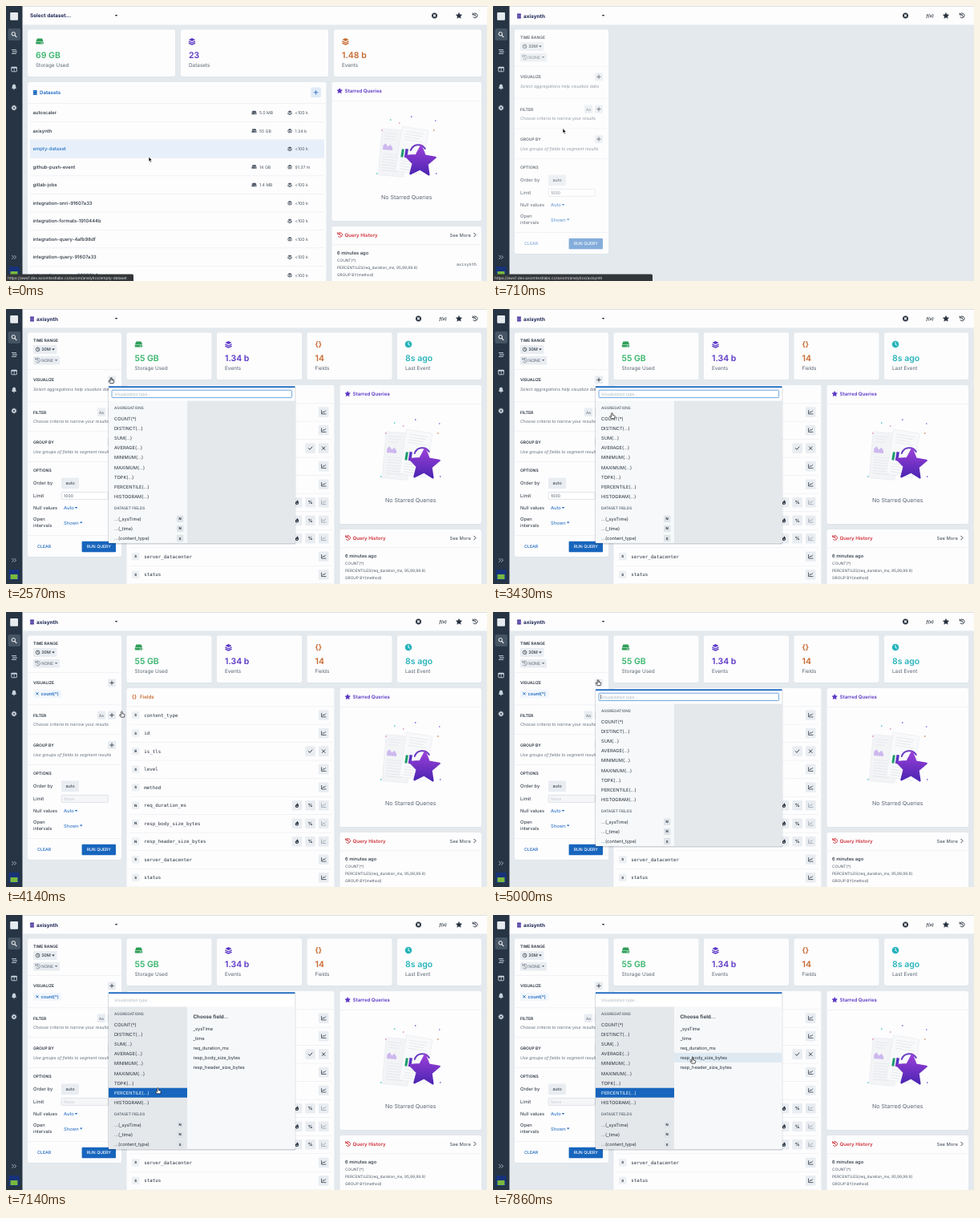
These frames come from a looping animation (600 px wide and 343 px high, 8000 ms). An HTML page:

```html
<!DOCTYPE html>
<html lang="en">
<head>
<meta charset="utf-8">
<title>Dataset query builder</title>
<style>
html, body { margin: 0; width: 100%; height: 100%; overflow: hidden; background: #e4e9ee; }
svg { display: block; width: 100vw; height: 100vh; }
text { font-family: Inter, Roboto, sans-serif; font-feature-settings: "calt" 0; text-rendering: geometricPrecision; white-space: pre; }
.mono { font-family: "DejaVu Sans Mono", monospace; }
</style>
</head>
<body>
<svg id="stage" viewBox="0 0 600 343"></svg>
<script>
const LOOP = 8000, STEPS = 56;
const INK = '#26303c', GREY = '#586370', FAINT = '#8a949f', LINE = '#e8ecf0', BUTTON = '#e9edf1',
  BLUE = '#1765bd', GREEN = '#38b56c', PURPLE = '#5a35c4', ORANGE = '#c8692f', TEAL = '#27b4bb', RED = '#d0323a';

// Steps at which the interface changes state
const AT = { hoverRow: 2, page: 4, loaded: 9, statusGone: 10, open: 16, added: 27, close: 28, reopen: 35, picked: 46 };

// Pointer path: step, x, y of the hot spot
const PATH = [[0, 178, 188], [1, 168, 176], [2, 140, 160], [3, 103, 154], [4, 87, 152.5], [5, 87, 152.5], [8, 91, 147],
  [12, 126.5, 93], [14, 131, 86], [19, 131, 86], [24, 148.5, 130], [25, 148, 135], [28, 148, 135], [32, 134, 93],
  [33, 131, 85], [35, 131, 85], [37, 133, 90], [38, 133, 90], [39, 138, 112], [42, 166, 218.5], [48, 167, 219.5],
  [49, 167, 219.5], [51, 212, 213], [52, 212, 213], [55, 249, 178.5]];

const MENU = ['COUNT(*)', 'DISTINCT(...)', 'SUM(...)', 'AVERAGE(...)', 'MINIMUM(...)', 'MAXIMUM(...)', 'TOPK(...)',
  'PERCENTILE(...)', 'HISTOGRAM(...)'];
const NUMERIC = ['_sysTime', '_time', 'req_duration_ms', 'resp_body_size_bytes', 'resp_header_size_bytes'];
const FIELDS = [['content_type', 'S'], ['id', 'S'], ['is_tls', 'B'], ['level', 'S'], ['method', 'S'], ['req_duration_ms', 'N'],
  ['resp_body_size_bytes', 'N'], ['resp_header_size_bytes', 'N'], ['server_datacenter', 'S'], ['status', 'S']];
const DATASETS = [['autoscaler', '<100 k', '5.0 MB'], ['axisynth', '1.34 b', '55 GB'], ['empty-dataset', '<100 k'],
  ['github-push-event', '91.37 m', '14 GB'], ['gitlab-jobs', '<100 k', '1.4 MB'], ['integration-onri-91607a33', '<100 k'],
  ['integration-formats-1910444b', '<100 k'], ['integration-query-4afb98df', '<100 k'],
  ['integration-query-91607a33', '<100 k'], ['integration-query-c30290b4', '<100 k']];

const text = (x, y, s, size, fill = INK, weight = 400, attrs = '') =>
  `<text x="${x}" y="${y}" font-size="${size}" fill="${fill}" font-weight="${weight}" ${attrs}>${s.replace(/</g, '&lt;')}</text>`;
const mono = (x, y, s, size, fill = INK, weight = 400) => text(x, y, s, size, fill, weight, 'class="mono"');
const rect = (x, y, w, h, fill, r = 0, attrs = '') =>
  `<rect x="${x}" y="${y}" width="${w}" height="${h}" rx="${r}" fill="${fill}" ${attrs}/>`;
const circle = (x, y, r, fill, attrs = '') => `<circle cx="${x}" cy="${y}" r="${r}" fill="${fill}" ${attrs}/>`;
const stroke = (d, color = INK, w = 1) =>
  `<path d="${d}" fill="none" stroke="${color}" stroke-width="${w}" stroke-linecap="round" stroke-linejoin="round"/>`;
const shape = (d, fill, attrs = '') => `<path d="${d}" fill="${fill}" ${attrs}/>`;
const group = (x, y, body, more = '') => `<g transform="translate(${x} ${y}) ${more}">${body}</g>`;
const range = (n, f) => Array.from({ length: n }, (_, i) => f(i)).join('');
const card = (x, y, w, h) => rect(x, y + .6, w, h, '#d8dfe5', 2.5) + rect(x, y, w, h, '#fdfdfe', 2.5);
const rule = (x1, x2, y) => rect(x1, y, x2 - x1, .6, LINE);

// Icons, centred on x, y
const caret = (x, y, c = INK) => shape(`M${x - 1.8} ${y - .9}h3.6l-1.8 2z`, c);
const plus = (x, y, c = INK) => stroke(`M${x - 2.3} ${y}h4.6M${x} ${y - 2.3}v4.6`, c, .8);
const cross = (x, y, r, c, w) => stroke(`M${x - r} ${y - r}l${2 * r} ${2 * r}m0 ${-2 * r}l${-2 * r} ${2 * r}`, c, w);
const layers = (x, y, s, c) => group(x, y, shape('M-4-2L0-4L4-2L0 0Z', c) +
  stroke('M-3.7.2L0 2L3.7.2M-3.7 2.4L0 4.2L3.7 2.4', c, 1.3), `scale(${s})`);
const database = (x, y, c) => range(3, i => rect(x - 2.6, y - 3 + i * 2.1, 5.2, 1.8, c, .8));
const disk = (x, y, s, c) => group(x, y, shape('M-3-3.4H3L4.6 0H-4.6Z', c) + rect(-4.8, .4, 9.6, 3.2, c, 1) +
  circle(2, 2, .6, '#fff') + circle(3.6, 2, .6, '#fff'), `scale(${s})`);
const clock = (x, y, r, c) => circle(x, y, r, 'none', `stroke="${c}" stroke-width=".7"`) + stroke(`M${x} ${y - r * .55}v${r * .55}l${r * .45} ${r * .3}`, c, .6);
const history = (x, y, c) => stroke(`M${x - 2.4} ${y - 1.6}A2.9 2.9 0 1 1 ${x - 2} ${y + 2}M${x - 2.8} ${y - 3}v2h2M${x} ${y - 1.5}v1.6l1.2.8`, c, .9);
const starPath = (r, inner) => 'M' + Array.from({ length: 10 }, (_, i) => {
  const a = i * Math.PI / 5 - Math.PI / 2, d = i % 2 ? r * inner : r;
  return `${(d * Math.cos(a)).toFixed(2)} ${(d * Math.sin(a)).toFixed(2)}`;
}).join('L') + 'Z';
const star = (x, y, r, c) => group(x, y, shape(starPath(r, .5), c, `stroke="${c}" stroke-width=".5" stroke-linejoin="round"`));
const chart = (x, y, c) => stroke(`M${x - 2.6} ${y - 2.3}v4.6h5.4M${x - 1.4} ${y + .7}l1.2-1.4l1 .9l1.6-1.9`, c, .75);
const flame = (x, y) => shape(`M${x} ${y - 3}C${x + 3} ${y - 1} ${x + 2.6} ${y + 2.7} ${x} ${y + 2.7}C${x - 3} ${y + 2.7} ${x - 2.4} ${y - .4} ${x - 1} ${y - 1}Q${x + .2} ${y - 1.4} ${x} ${y - 3}`, INK) + circle(x, y + 1, .7, '#fff');
const button = (x, y, w = 12.6) => rect(x - w / 2, y - w / 2, w, w, BUTTON, 1.3);

function sidebar() {
  const c = '#c9d2dc', base = '#263443';
  return rect(0, 0, 20.5, 343, base) + rect(5.2, 8, 9.8, 9.8, '#e6ebf0', 1) +
    rect(2.5, 28, 15.5, 15, '#465564', 2) + circle(9.3, 34.8, 2.2, 'none', `stroke="#fff" stroke-width="1"`) + stroke('M11 36.6l2 2', '#fff', 1.1) +
    range(3, i => rect(i % 2 ? 8 : 7, 54.2 + i * 2.3, 6, 1, c)) +
    rect(6.8, 76.2, 6.6, 5.6, 'none', .6, `stroke="${c}" stroke-width=".9"`) + rect(6.6, 76, 7, 1.7, c) + rect(9.8, 77, .7, 5, c) +
    shape('M7 103C8 102 7.6 100 8 99Q8.6 97.6 10 97.4Q11.6 97.6 12 99C12.4 100 12 102 13 103Z', c) + circle(10, 103.8, .8, c) +
    range(4, i => group(10, 127, rect(-.7, -3.3, 1.4, 6.6, c), `rotate(${i * 45})`)) + circle(10, 127, 2.4, c) + circle(10, 127, 1, base) +
    stroke('M7.5 311.2l2.1 2.1l-2.1 2.1M10.5 311.2l2.1 2.1l-2.1 2.1', c, .8) +
    rect(3.5, 325, 13, 13, '#17327a') + rect(5.5, 331, 9, 6, '#79b83e');
}

function topbar(home) {
  const x = home ? 534.5 : 514.5;
  return rect(20.5, 0, 579.5, 23.4, '#fdfdfe') + rect(20.5, 0, 579.5, .7, '#cfd5db') +
    (home ? text(30, 14.4, 'Select dataset...', 6.4, '#1c2553', 700)
      : database(32.5, 12.5, '#46309c') + text(38, 14.6, 'axisynth', 6.4, '#1c2553', 700) + text(540.5, 14.2, 'f(x)', 5.4, INK, 600, 'font-style="italic"')) +
    caret(137.5, 12) + circle(x, 12, 3.5, INK) + circle(x, 12, 1.4, '#fff') + cross(x, 12, 2.2, '#fff', .5) +
    star(565, 12.2, 3.8, INK) + history(585, 12, INK);
}

const stat = (x, w, color, icon, value, label) => card(x, 29.5, w, 58.5) + icon +
  text(x + 10, 64.6, value, 10.5, color, 600) + text(x + 10, 75.5, label, 6.4, GREY);

function illustration() {
  const dots = [[-20, -36, TEAL], [-9, -32, '#e06bb0'], [6, -40, PURPLE], [36, -35, '#8b4be0'], [34, -23, ORANGE], [-31, -23, '#e06bb0'], [-37, 31, TEAL], [37, 31, PURPLE]];
  const ruled = (x, y, n, w) => range(n, i => rect(x, y + i * 3.4, w - (i % 3) * 2, .8, '#e3e6eb'));
  return group(-18, 4, rect(-15, -28, 32, 58, '#f3f4f6', 1, 'stroke="#e6e9ed" stroke-width=".6"') + ruled(-11, -23, 3, 16) +
      shape('M-12 -2V-7L-9 -10L-6 -6L-3 -9L0 -5V-2Z', '#cdb8ee') + ruled(-11, 3, 7, 20), 'rotate(5)') +
    group(5, 2, rect(-15, -28, 33, 56, '#f8f9fa', 1, 'stroke="#e8eaee" stroke-width=".6"') + ruled(-10, -23, 4, 23) +
      rect(-11, 0, 3, 10, '#1d9c6c') + rect(-6.5, -1, 3.5, 11, PURPLE) + ruled(-10, 14, 4, 16), 'rotate(9)') +
    stroke('M5 2A10 10 0 0 1 23 0', '#6b3cc4', 2) +
    group(17, 16, shape(starPath(19.5, .48), 'url(#violet)', 'stroke="url(#violet)" stroke-width="2.4" stroke-linejoin="round"'), 'rotate(3)') +
    dots.map(([x, y, c]) => circle(x, y, .8, c)).join('');
}

function rightColumn(home) {
  const x = home ? 406.5 : 416.5, w = 593 - x, mid = x + w / 2;
  return card(x, 95, w, 173) + star(x + 9.7, 106, 3.4, PURPLE) + text(x + 16, 108.3, 'Starred Queries', 6.1, PURPLE, 600) + rule(x, 593, 118) +
    group(mid, 178, illustration()) + text(mid, 241, 'No Starred Queries', 7, GREY, 400, 'text-anchor="middle"') +
    card(x, 275, w, 80) + history(x + 10, 285.5, RED) + text(x + 16, 288, 'Query History', 6.1, RED, 600) +
    text(553.5, 287.6, 'See More', 5.8, '#3c4754') + stroke('M583.8 283.2l2.2 2.3l-2.2 2.3', INK, .9) + rule(x, 593, 297.5) +
    text(x + 6.5, 310.4, '6 minutes ago', 5.8, INK, 500) +
    ['COUNT(*)', 'PERCENTILES(req_duration_ms, 95,99,99.9)', 'GROUP BY(method)'].map((s, i) => text(x + 6.5, 319.2 + i * 8.9, s, 4.8, '#4a5562')).join('') +
    (home ? mono(562, 323.6, 'axisynth', 5.2, GREY) : '');
}

function homePage(n) {
  const hovered = n < AT.hoverRow ? 2 : 1;
  return stat(27, 184, GREEN, disk(42, 44, 1, '#2f9e58'), '69 GB', 'Storage Used') +
    stat(218, 184, PURPLE, layers(232, 44, 1, PURPLE), '23', 'Datasets') +
    stat(409, 184, ORANGE, layers(423.5, 44, 1, ORANGE), '1.48 b', 'Events') +
    card(27, 95, 372.5, 260) + database(36.3, 108, BLUE) + text(42, 110.2, 'Datasets', 6.1, BLUE, 600) +
    rect(380.3, 101.5, 12.6, 12.6, '#dfebf7', 1.3) + plus(386.6, 107.8, BLUE) + rule(27, 399.5, 121) +
    DATASETS.map(([name, events, size], i) => {
      const y = 133 + i * 22.5, on = i === hovered;
      return (on ? rect(30, y - 11.2, 367, 22.5, '#e7f0fa') : '') + rule(30, 397, y + 11) +
        text(33.5, y + 2.1, name, 5.9, on ? '#2672c4' : INK, 500) + layers(354, y, .65, '#4a5562') + text(360.5, y + 2, events, 5.2, '#4a5562') +
        (size ? disk(309.5, y, .65, '#4a5562') + text(316, y + 2, size, 5.2, '#4a5562') : '');
    }).join('') + rightColumn(true);
}

function queryPanel(n) {
  const ready = n >= AT.loaded, counted = n >= AT.added;
  const title = (y, s) => text(34, y, s, 5, INK, 600), hint = (y, s) => text(34, y, s, 5.25, '#65707d', 400, 'font-style="italic"');
  const add = y => button(132, y, 10.2) + plus(132, y);
  const body = title(40.6, 'TIME RANGE') +
    rect(34, 45.1, 29.5, 10.8, BUTTON, 1.3) + clock(39.6, 50.4, 2.3, INK) + text(44.3, 52.3, '30M', 5.2, INK, 500) + caret(59, 50.3) +
    rect(34, 58.8, 33, 10.8, BUTTON, 1.3) + history(39.6, 64.1, FAINT) + text(44.3, 66, 'NONE', 5.1, '#6d7885', 500) + caret(62.6, 64, '#6d7885') +
    rule(27, 144, 75) + title(90.3, 'VISUALIZE') + add(88.3) +
    (counted ? rect(34, 96.8, 35.5, 10, '#f1f6fc', 1.3) + cross(39, 101.8, 1.3, BLUE, .9) + text(43.6, 103.7, 'count(*)', 5.5, BLUE, 600)
      : hint(102, 'Select aggregations help visualize data')) +
    rule(27, 144, 115.5) + title(130.8, 'FILTER') + button(119, 128.7, 10.4) + text(116, 130.5, 'Aa', 4.7, GREY) + add(128.7) +
    hint(142.3, 'Choose criteria to narrow your results') +
    rule(27, 144, 152.5) + title(168, 'GROUP BY') + add(166) + hint(179.5, 'Use groups of fields to segment results') +
    rule(27, 144, 190) + title(202.8, 'OPTIONS') + text(34, 219.4, 'Order by', 5.9) + rect(69, 210.6, 22, 13.6, BUTTON, 1.3) + text(74.5, 219.3, 'auto', 5.4) +
    text(34, 234.8, 'Limit', 5.9) + rect(69.2, 228.4, 58.2, 9, counted ? '#f5f6f8' : '#fff', 1, 'stroke="#ccd3da" stroke-width=".6"') +
    text(72.3, 234.8, counted ? 'None' : '1000', 5.1, counted ? '#c0c8d0' : '#4a5562') +
    text(34, 249.8, 'Null values', 5.8) + text(72, 249.8, 'Auto', 5.8, BLUE) + caret(87.5, 247.8, BLUE) +
    text(34, 264, 'Open', 5.8) + text(34, 272.4, 'intervals', 5.8) + text(72, 268.5, 'Shown', 5.8, BLUE) + caret(93.7, 266.5, BLUE);
  const actions = text(39, 298.3, 'CLEAR', 5.3, BLUE, 500) + rect(94.6, 289.8, 42.4, 13.4, BLUE, 1) +
    text(115.8, 298.4, 'RUN QUERY', 5.2, '#fff', 500, 'text-anchor="middle"');
  return card(27, 29.5, 117, 279.5) + `<g opacity="${ready ? 1 : .7}">${body}</g>` +
    rule(27, 144, 282) + `<g opacity="${ready ? 1 : .52}">${actions}</g>`;
}

function datasetContent() {
  const badge = (y, s) => rect(157, y - 4.7, 9.4, 9.4, '#edf0f3', 1) + text(161.7, y + 1.6, s, 4.4, INK, 700, 'text-anchor="middle"');
  return stat(150.5, 106, GREEN, disk(165.5, 44, 1, '#2f9e58'), '55 GB', 'Storage Used') +
    stat(263, 106, PURPLE, layers(277.5, 44, 1, PURPLE), '1.34 b', 'Events') +
    stat(375.5, 106, ORANGE, text(385.5, 47, '{}', 9, ORANGE, 700), '14', 'Fields') +
    stat(488, 105, TEAL, circle(502, 44, 4.3, TEAL) + stroke('M502 41.5v2.7l1.6 1', '#fff', .9), '8s ago', 'Last Event') +
    card(150.5, 95, 259, 260) + text(157, 108.4, '{}', 6.5, ORANGE, 700) + text(167, 108.3, 'Fields', 6.1, ORANGE, 600) + rule(150.5, 409.5, 117.5) +
    FIELDS.map(([name, type], i) => {
      const y = 128.6 + i * 22.52;
      const tools = type === 'B' ? button(379.6, y) + stroke(`M377.3 ${y}l1.6 1.7l3-3.4`, INK, .9) + button(396.2, y) + cross(396.2, y, 1.8, INK, .9)
        : type === 'N' ? button(363, y) + flame(363, y) + button(379.6, y) + text(379.6, y + 2.1, '%', 5.8, INK, 600, 'text-anchor="middle"') + button(396.2, y) + chart(396.2, y, '#929ca7')
        : button(396.2, y) + chart(396.2, y, INK);
      return badge(y, type) + mono(172.3, y + 2, name, 5.83) + tools + rule(154, 406, y + 11.2);
    }).join('') + rightColumn(false);
}

function popup(n, tip) {
  const picked = n >= AT.picked, overList = tip.x > 128 && tip.x < 226;
  const hit = (top, count) => { const i = Math.floor((tip.y - top + 6.05) / 12.1); return i >= 0 && i < count ? i : -1; };
  const hover = overList ? hit(137, MENU.length) : -1;
  const fieldHover = picked && tip.x > 226 ? hit(141.5, NUMERIC.length) : -1;
  const focused = hover < 0 && !picked, light = '#f6f8f9', dim = '#e5e8eb';
  let out = rect(127.2, 97, 234.1, 196.5, '#17263a', 1.5, 'opacity=".2"') + rect(128, 96.3, 232.5, 195.5, '#fff', 1) + rect(128, 96.3, 232.5, 1.8, BLUE) +
    rect(128, 114.5, 98, 177.3, picked ? dim : light) + rect(226, 114.5, 134.5, 177.3, picked ? light : dim) +
    (focused ? rect(132, 101.2, 224.6, 9.4, '#fff', 1, 'stroke="#4a8fd4" stroke-width=".8"') : '') +
    text(135, 107.7, 'Visualization type...', 4.9, '#aab3bd', 400, 'font-style="italic"') +
    (n >= AT.reopen && focused ? rect(134.3, 103, .6, 5.8, INK) : '') + text(135, 125.3, 'AGGREGATIONS', 4.7, '#4d5967', 500);
  MENU.forEach((s, i) => {
    const y = 137 + i * 12.1, active = picked && i === 7;
    if (active || i === hover) out += rect(128, y - 6, 98, 12, active ? BLUE : '#dfe9f1');
    out += text(135, y + 2, s, 5.7, active ? '#fff' : INK);
  });
  out += text(135, 249.6, 'DATASET FIELDS', 4.7, '#4d5967', 500);
  [['_sysTime', 'N'], ['_time', 'N'], ['content_type', 'S']].forEach(([s, type], i) => {
    const y = 261.6 + i * 12.1;
    out += text(135, y + 2, `...(${s})`, 5.7) + rect(213, y - 4, 8.4, 8.4, '#dfe4e9', 1) + text(217.2, y + 1.7, type, 4.2, INK, 700, 'text-anchor="middle"');
  });
  if (picked) {
    out += text(233.4, 128.9, 'Choose field...', 6.3, INK, 600);
    NUMERIC.forEach((s, i) => {
      const y = 141.5 + i * 12.1;
      if (i === fieldHover) out += rect(226, y - 6, 134.5, 12, '#dfe9f1');
      out += text(233.4, y + 2, s, 5.7);
    });
  } else if (hover >= 0) {
    const word = MENU[hover].split('(')[0].toLowerCase();
    out += text(233.4, 130.9, MENU[hover], 6.4, INK, 600) +
      text(233.4, 143, `Visualize the ${word} value for a field in`, 5.35) + text(233.4, 151.4, 'each time duration.', 5.35);
  }
  return out;
}

function pointerAt(n) {
  const k = Math.max(1, PATH.findIndex(p => p[0] >= n)), [a, x0, y0] = PATH[k - 1], [b, x1, y1] = PATH[k];
  const u = (n - a) / (b - a);
  return { x: x0 + (x1 - x0) * u, y: y0 + (y1 - y0) * u };
}

function pointer(n, { x, y }) {
  const hand = (n > 1 && n < 4) || (n >= 14 && n < 30) || n >= 33;
  const d = hand ? 'M-.8 0Q0-.8.8 0V2.4L3.2 3Q3.8 3.4 3.6 4.4L3 6.6H-1.2L-3 4.2Q-2.9 3-1.9 3.6L-.8 4.5Z' : 'M0 0V6.2L1.4 5L2.4 7.2L3.5 6.7L2.5 4.6H4.3Z';
  return group(x, y, shape(d, hand ? '#fff' : '#000', `stroke="${hand ? '#111' : '#fff'}" stroke-width=".7" stroke-linejoin="round"`));
}

function statusBar(n) {
  const row = n < AT.hoverRow;
  return rect(-2, 334.6, row ? 161 : 201, 10, '#333638', 1.5) +
    text(2, 341, 'https://aws1.dev.axiomtestlabs.co/axiom/analytics/' + (row ? 'empty-dataset' : 'axisynth'), 4.8, '#e3e5e7');
}

function view(n) {
  const tip = pointerAt(n), home = n < AT.page;
  const open = (n >= AT.open && n < AT.close) || n >= AT.reopen;
  return '<defs><linearGradient id="violet" x2="0" y2="1"><stop stop-color="#9a40d8"/><stop offset="1" stop-color="#4d25b2"/></linearGradient></defs>' +
    rect(0, 0, 600, 343, '#e4e9ee') + topbar(home) +
    (home ? homePage(n) : queryPanel(n) + (n >= AT.loaded ? datasetContent() : '')) +
    sidebar() + (open ? popup(n, tip) : '') + (n < AT.statusGone ? statusBar(n) : '') + pointer(n, tip);
}

const stage = document.getElementById('stage');
let shown = -1;
function draw(now) {
  // The small lead absorbs step times rounded down to 10 ms
  const n = Math.floor((now % LOOP + 6) * STEPS / LOOP) % STEPS;
  if (n !== shown) stage.innerHTML = view(shown = n);
  requestAnimationFrame(draw);
}
draw(0);
</script>
</body>
</html>
```
